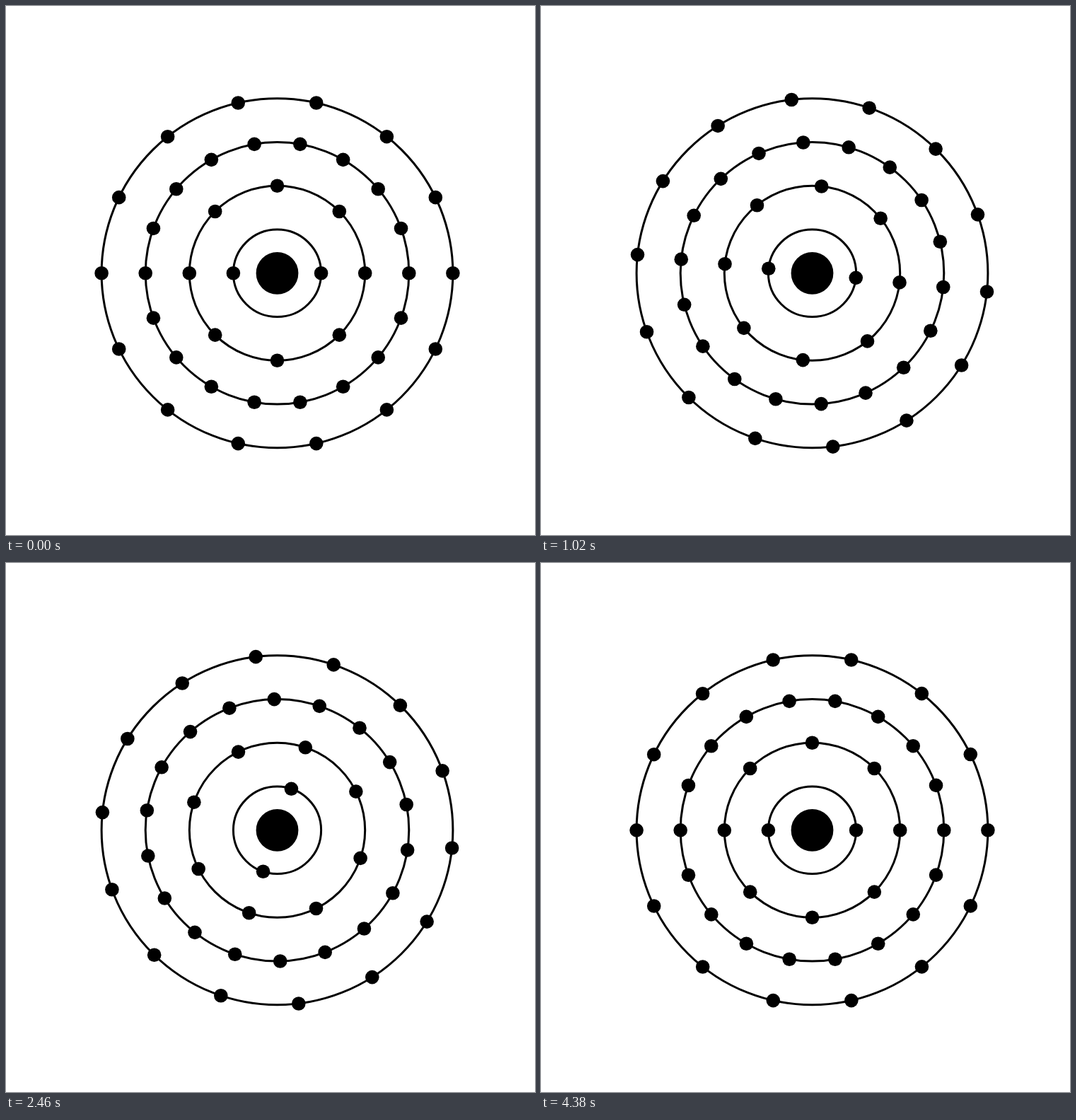
Write an HTML page with a canvas that moves like this. It is 748 by 748 pixels and loops after 4510 ms.

```html
<!DOCTYPE html>
<html lang="en">
<head>
<meta charset="utf-8">
<title>Electron shells</title>
<style>
  html, body { margin: 0; width: 100%; height: 100%; overflow: hidden; background: #fff; }
  canvas { display: block; width: 100vw; height: 100vh; }
</style>
</head>
<body>
<canvas id="stage" width="748" height="748"></canvas>
<script>
const ctx = document.getElementById('stage').getContext('2d');
const LOOP = 4510, STEP = 30, STEPS = 150;
const CX = 383.5, CY = 377.8;
const GAP_X = 62.1, GAP_Y = 61.75;
const SHELLS = [2, 8, 18, 14];
const TURN = Math.PI * 2;

// Cubic in up to the pivot, cubic out after it
function ease(t, pivot = 0.03) {
  return t < pivot
    ? t ** 3 / pivot ** 2
    : 1 - (1 - t) ** 3 / (1 - pivot) ** 2;
}

function disc(x, y, r) {
  ctx.beginPath();
  ctx.arc(x, y, r, 0, TURN);
  ctx.fill();
}

function draw(angle) {
  ctx.fillStyle = '#fff';
  ctx.fillRect(0, 0, 748, 748);
  ctx.fillStyle = ctx.strokeStyle = '#000';
  ctx.lineWidth = 3;
  disc(CX, CY, 29.9);
  SHELLS.forEach((count, i) => {
    const rx = GAP_X * (i + 1), ry = GAP_Y * (i + 1);
    ctx.beginPath();
    ctx.ellipse(CX, CY, rx, ry, 0, 0, TURN);
    ctx.stroke();
    for (let n = 0; n < count; n++) {
      const a = angle + n * TURN / count;
      disc(CX + rx * Math.cos(a), CY + ry * Math.sin(a), 9.8);
    }
  });
}

const start = performance.now();
function tick() {
  const time = (performance.now() - start) % LOOP;
  const step = Math.min(Math.floor(time / STEP), STEPS);
  draw(2 * TURN * ease(step / STEPS));
  requestAnimationFrame(tick);
}
tick();
</script>
</body>
</html>
```
